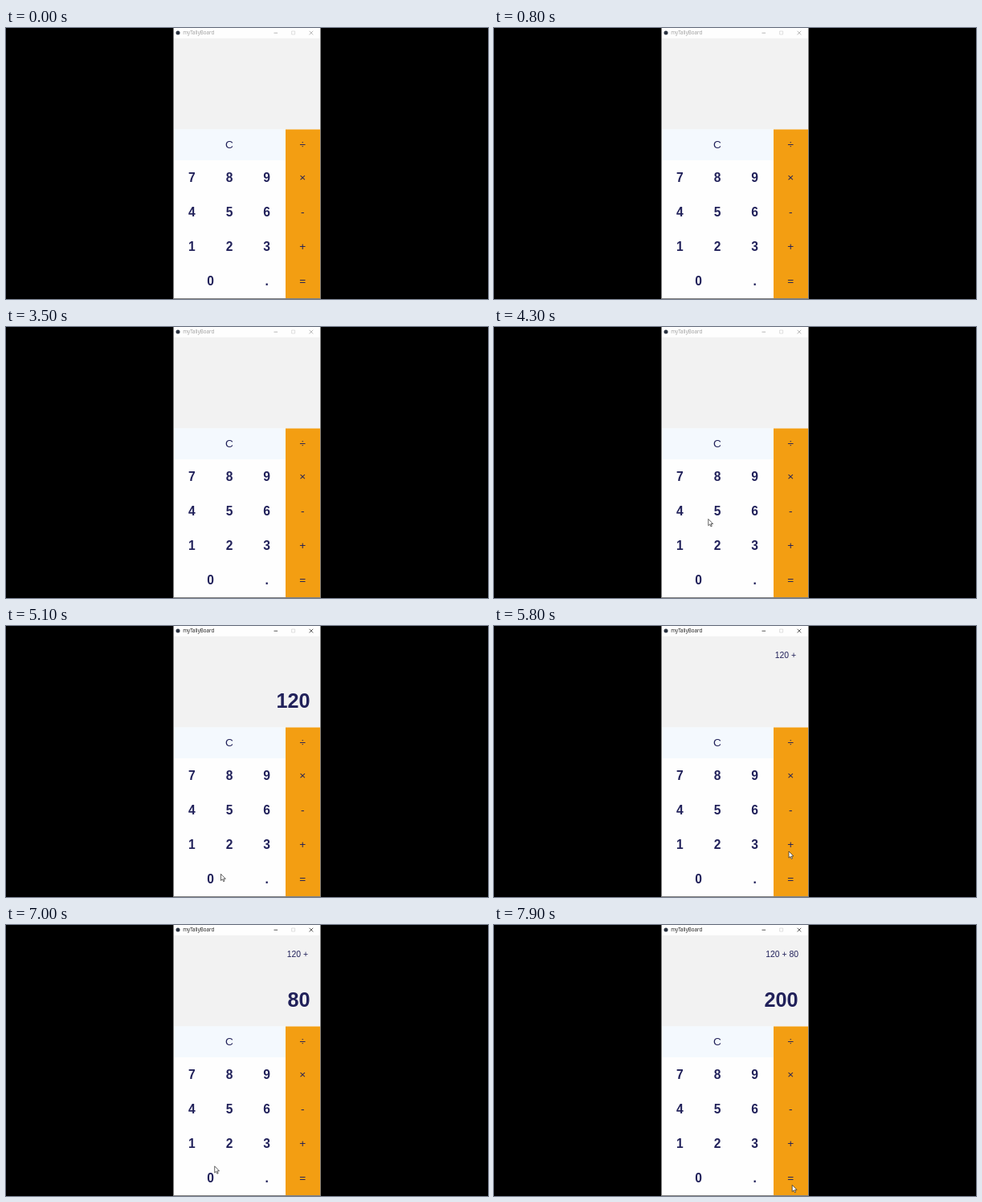
Animation of 600x338 px, one loop 8 s. Source, as an HTML page:

```html
<!DOCTYPE html>
<html lang="en">
<head>
<meta charset="utf-8">
<title>Calculator</title>
<style>
  html, body { margin: 0; width: 100%; height: 100%; overflow: hidden; background: #000; }
  svg { display: block; width: 100%; height: 100%; }
  text { font-family: "Liberation Sans", Arial, sans-serif; fill: #21215a; }
  .bar text { font: 6.2px "Open Sans", sans-serif; fill: currentColor; }
  .bar path { fill: none; stroke: currentColor; stroke-width: .7; }
  .key { font-size: 13.6px; text-anchor: middle; }
  .digit { font-size: 15.6px; font-weight: bold; }
  #total, #current { text-anchor: end; white-space: pre; }
  #total { font-size: 10.4px; }
  #current { font-size: 25.2px; font-weight: bold; }
</style>
</head>
<body>
<svg viewBox="0 0 600 338">
  <rect width="600" height="338"/>
  <rect x="208" width="184" height="338" fill="#808080"/>
  <rect x="209" width="182" height="337" fill="#fefefe"/>
  <g class="bar" id="bar">
    <circle cx="214" cy="6" r="2.5" fill="#2b3340"/>
    <text x="220.3" y="8.2">myTallyBoard</text>
    <path d="M333.5 6.2h4.6M377.6 3.8l4.6 4.6m0-4.6l-4.6 4.6"/>
    <path d="M355.6 4h4v4h-4z" style="stroke:#d2d2d2"/>
  </g>
  <rect x="209" y="12.8" width="182" height="113.7" fill="#f2f2f2"/>
  <rect x="209" y="126.3" width="139" height="38.7" fill="#f4f9fe"/>
  <rect x="348" y="126.5" width="43" height="210.5" fill="#f39e12"/>
  <g id="keys"></g>
  <text id="total" x="379" y="39.6"></text>
  <text id="current" x="378.6" y="102"></text>
  <path id="cursor" d="M0 0V8.2L1.9 6.5 3.2 9.4 4.5 8.8 3.2 6H5.8Z"
        fill="#fff" stroke="#222" stroke-width=".7" stroke-linejoin="round"/>
</svg>
<script>
const $ = id => document.getElementById(id);
const LOOP = 8000, STEP = 100, ENTER = 4000, FOCUS = 4400;

const addKey = (label, x, y, cls = "") =>
  $("keys").insertAdjacentHTML("beforeend", `<text class="key ${cls}" x="${x}" y="${y}">${label}</text>`);

const colX = c => 231.4 + c * 46.6;
addKey("C", colX(1), 150.2);
addKey("÷", 369.3, 150);
["789×", "456-", "123+", "0.="].forEach((row, r) => {
  const y = 192 + r * 43.15, digits = [...row], op = digits.pop();
  digits.forEach((d, c) => addKey(d, colX(r < 3 ? c : c * 1.5 + 0.5), y, "digit"));
  addKey(op, 369.3, y - 1.1);
});

// Pointer moves: [start, duration, x, y]
const moves = [
  [ENTER, 300, 266.8, 239.5], [4300, 200, 233, 272], [4600, 200, 274, 274], [4900, 200, 267.5, 309.3],
  [5100, 500, 367, 281], [5800, 400, 280.7, 195.5], [6500, 500, 259.7, 300.8], [7000, 400, 371.2, 324.3]
];
const presses = [[4500, "1"], [4800, "2"], [5000, "0"], [5800, "+"], [6300, "8"], [6900, "0"], [7600, "="]];

const ease = k => 1 - (1 - Math.min(1, Math.max(0, k))) ** 3;

const pointerAt = t => moves.reduce(([x, y], [start, span, toX, toY]) => {
  const k = ease((t - start) / span);
  return [x + (toX - x) * k, y + (toY - y) * k];
}, [388, 222]);

function displayAt(t) {
  let total = "", current = "";
  for (const [time, key] of presses) {
    if (time > t) break;
    if (key === "+") {
      total = current + " + ";
      current = "";
    } else if (key === "=") {
      const sum = parseInt(total) + Number(current);
      total += current;
      current = String(sum);
    } else current += key;
  }
  return [total, current];
}

function draw(now) {
  const t = Math.floor(now % LOOP / STEP) * STEP;
  [$("total").textContent, $("current").textContent] = displayAt(t);
  $("bar").style.color = t < FOCUS ? "#999" : "#111";
  $("cursor").style.display = t < ENTER ? "none" : "";
  $("cursor").setAttribute("transform", `translate(${pointerAt(t)})`);
}

let start;
function tick(now) {
  start ??= now;
  draw(now - start);
  requestAnimationFrame(tick);
}
draw(0);
requestAnimationFrame(tick);
</script>
</body>
</html>
```
